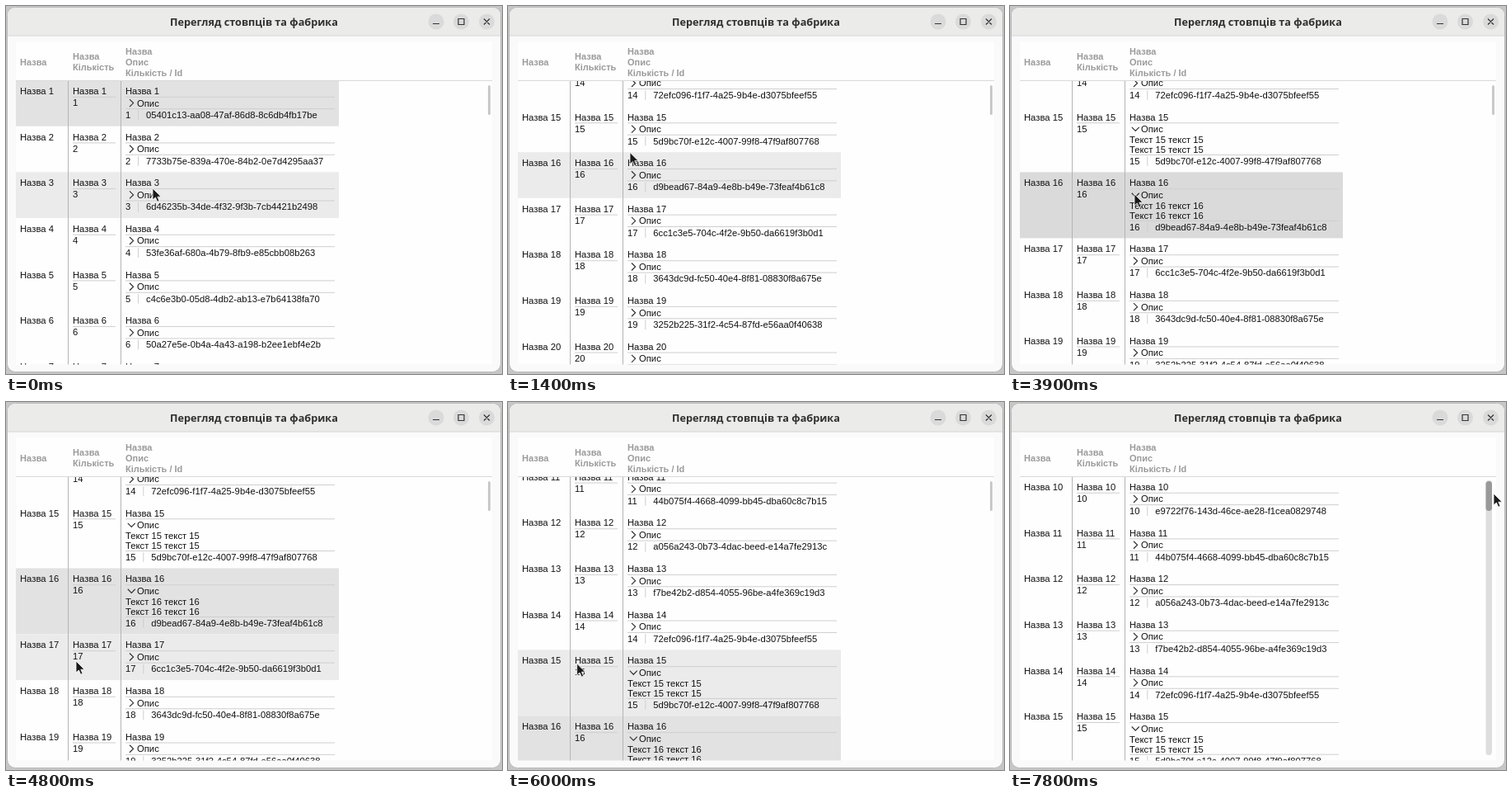
An HTML page that plays this animation: 602x446 px, repeating every 8000 ms.

```html
<!DOCTYPE html>
<html lang="uk">
<head>
<meta charset="utf-8">
<title>Перегляд стовпців та фабрика</title>
<style>
  html, body { margin: 0; width: 100%; height: 100%; overflow: hidden; background: #c6c6c6; }
  svg { display: block; width: 602px; height: 446px; }
  text { font: 11.25px "Liberation Sans", Arial, sans-serif; fill: #111; }
  .title { font: bold 12.7px "Open Sans", "Noto Sans", sans-serif; fill: #303030; text-anchor: middle; }
  .head text { font-weight: bold; font-size: 11px; fill: #9b9b9b; }
  .rule { stroke: #cfcfcf; }
  .col { stroke: #b4b4b4; }
  .icon { fill: none; stroke: #333; stroke-width: 1.2; }
</style>
</head>
<body>
<svg id="stage" viewBox="0 0 602 446">
  <defs>
    <clipPath id="view"><rect x="12" y="90" width="578" height="344.5"/></clipPath>
  </defs>
  <rect x="1.5" y="1.5" width="599" height="442" rx="10" fill="#fafafa" stroke="#b9b9b9"/>
  <path d="M2 36V12Q2 2 12 2H590Q600 2 600 12V36Z" fill="#ebebea"/>
  <path d="M2 36H600" stroke="#d6d6d6"/>
  <text class="title" x="301" y="24">Перегляд стовпців та фабрика</text>
  <g fill="#dadada">
    <circle cx="522" cy="19" r="9.5"/><circle cx="552.5" cy="19" r="9.5"/><circle cx="583.5" cy="19" r="9.5"/>
  </g>
  <path class="icon" d="M518 21.5H526M549 15.5H556V22.5H549ZM580 15.5L587 22.5M587 15.5L580 22.5"/>
  <rect x="12" y="43" width="578" height="391.5" fill="#fefefe"/>
  <g class="head">
    <text x="17" y="71.7">Назва</text>
    <text x="81" y="64.9">Назва</text><text x="81" y="77.7">Кількість</text>
    <text x="145" y="58.8">Назва</text><text x="145" y="71.7">Опис</text><text x="145" y="84.6">Кількість / Id</text>
  </g>
  <g clip-path="url(#view)">
    <g id="rows"></g>
    <path class="col" d="M75.5 90V435M139.5 90V435"/>
  </g>
  <path d="M12 90.5H590" stroke="#d9d9d9"/>
  <rect id="thin" x="585" y="96" width="3" height="36" rx="1.5" fill="#c9c9c9"/>
  <g id="wide">
    <rect x="577.5" y="95" width="7.5" height="333" rx="3.7" fill="#dedede"/>
    <rect x="577.5" y="96" width="7.5" height="36" rx="3.7" fill="#999"/>
  </g>
  <path id="cursor" d="M0 0V14L3.4 11L5.7 16.2L8 15.2L5.8 10.2H10.2Z" fill="#1a1a1a" stroke="#fff" stroke-width=".8"/>
</svg>
<script>
const LOOP = 8000, STEP = 100, TOP = 90, ROW_H = 55.65, EXTRA = 24.3, COUNT = 26;

const ids = `05401c13-aa08-47af-86d8-8c6db4fb17be
7733b75e-839a-470e-84b2-0e7d4295aa37
6d46235b-34de-4f32-9f3b-7cb4421b2498
53fe36af-680a-4b79-8fb9-e85cbb08b263
c4c6e3b0-05d8-4db2-ab13-e7b64138fa70
50a27e5e-0b4a-4a43-a198-b2ee1ebf4e2b
31ac26ea-3c7f-4dc6-bca7-7943ab4387aa
738c97f1-71d4-4cc5-a0b2-0aae820eb30e
4ed8cb29-c590-46c7-8b6a-26046c1cfa8d
e9722f76-143d-46ce-ae28-f1cea0829748
44b075f4-4668-4099-bb45-dba60c8c7b15
a056a243-0b73-4dac-beed-e14a7fe2913c
f7be42b2-d854-4055-96be-a4fe369c19d3
72efc096-f1f7-4a25-9b4e-d3075bfeef55
5d9bc70f-e12c-4007-99f8-47f9af807768
d9bead67-84a9-4e8b-b49e-73feaf4b61c8
6cc1c3e5-704c-4f2e-9b50-da6619f3b0d1
3643dc9d-fc50-40e4-8f81-08830f8a675e
3252b225-31f2-4c54-87fd-e56aa0f40638
489580a0-4eb2-4c8a-82e6-ed7657e1832c
c9d7744a-cc33-4d17-8c8a-34b3c03f5ef6`.split("\n");

let seed = 7;
const hex = () => ((seed = (seed * 16807) % 2147483647) % 16).toString(16);
while (ids.length < COUNT) {
  ids.push("xxxxxxxx-xxxx-4xxx-9xxx-xxxxxxxxxxxx".replace(/x/g, hex));
}

// [time, value...]
const scrollKeys = [
  [0, 0], [400, 190], [500, 190], [1400, 747.6], [4800, 747.6], [5100, 800],
  [5400, 876], [5600, 887], [6300, 330], [6400, 330], [6800, 220.6],
  [6900, 220.6], [7400, 500.9], [LOOP, 500.9]
];
const cursorKeys = [
  [0, 178, 221], [500, 178, 221], [1400, 148, 177.5], [1500, 148, 177.5],
  [2000, 150, 148], [2500, 150, 148], [2900, 162, 164], [3300, 185, 232],
  [3700, 151, 228], [4200, 151, 228], [4800, 85, 314], [5700, 85, 314],
  [6800, 80, 325], [7200, 80, 325], [7700, 587, 111], [LOOP, 587, 111]
];
const openAt = { 15: 2100, 16: 3900 };
const selectKeys = [[0, 1], [2100, 15], [3900, 16]];

function sample(keys, t) {
  const i = Math.max(1, keys.findIndex(k => k[0] >= t));
  const a = keys[i - 1], b = keys[i];
  const p = (t - a[0]) / (b[0] - a[0]);
  return a.slice(1).map((v, j) => v + (b[j + 1] - v) * p);
}

const $ = id => document.getElementById(id);

function makeRow(id, i) {
  const n = i + 1, g = document.createElementNS("http://www.w3.org/2000/svg", "g");
  const shift = n > 9 ? 6.3 : 0;
  const note = `Текст ${n} текст ${n}`;
  g.innerHTML = `
    <rect class="bg" x="12" width="392" height="${ROW_H}"/>
    <text x="17" y="17">Назва ${n}</text>
    <text x="81" y="17">Назва ${n}</text>
    <path class="rule" d="M81 20.3H133M145 20.3H399"/>
    <text x="81" y="31">${n}</text>
    <text x="145" y="17">Назва ${n}</text>
    <path class="icon arrow" d="M-2.3 -4.5L2.3 0L-2.3 4.5"/>
    <text x="159" y="31.5">Опис</text>
    <g class="note"><text x="145" y="44.6">${note}</text><text x="145" y="56.5">${note}</text></g>
    <g class="foot">
      <path class="rule" d="M145 34.7H399M${160.5 + shift} 36.5V48"/>
      <text x="145" y="46">${n}</text>
      <text x="${170 + shift}" y="46">${id}</text>
    </g>`;
  $("rows").append(g);
  const part = name => g.querySelector("." + name);
  return { n, g, bg: part("bg"), arrow: part("arrow"), note: part("note"), foot: part("foot") };
}

const rows = ids.map(makeRow);
const show = (el, on) => el.setAttribute("visibility", on ? "inherit" : "hidden");
const move = (el, x, y, more = "") => el.setAttribute("transform", `translate(${x} ${y})${more}`);

function rowFill(selected, hover) {
  if (selected) return hover ? "#dadada" : "#e2e2e2";
  return hover ? "#ebebeb" : "none";
}

function draw(t) {
  const [scroll] = sample(scrollKeys, t);
  const [x, y] = sample(cursorKeys, t);
  const selected = selectKeys.filter(k => k[0] <= t).pop()[1];
  let top = TOP - scroll;
  for (const row of rows) {
    const open = t >= (openAt[row.n] ?? Infinity);
    const h = ROW_H + (open ? EXTRA : 0);
    const hover = x >= 12 && x < 404 && y >= top && y < top + h;
    move(row.g, 0, top.toFixed(2));
    row.bg.setAttribute("height", h);
    row.bg.setAttribute("fill", rowFill(row.n === selected, hover));
    move(row.arrow, 152.3, 27.6, open ? " rotate(90)" : "");
    move(row.foot, 0, open ? EXTRA : 0);
    show(row.note, open);
    top += h;
  }
  const near = x > 560;
  show($("wide"), near);
  show($("thin"), !near);
  move($("cursor"), x, y);
}

let start;
function tick(now) {
  start ??= now;
  draw(Math.floor(((now - start) % LOOP) / STEP) * STEP);
  requestAnimationFrame(tick);
}
draw(0);
requestAnimationFrame(tick);
</script>
</body>
</html>
```
